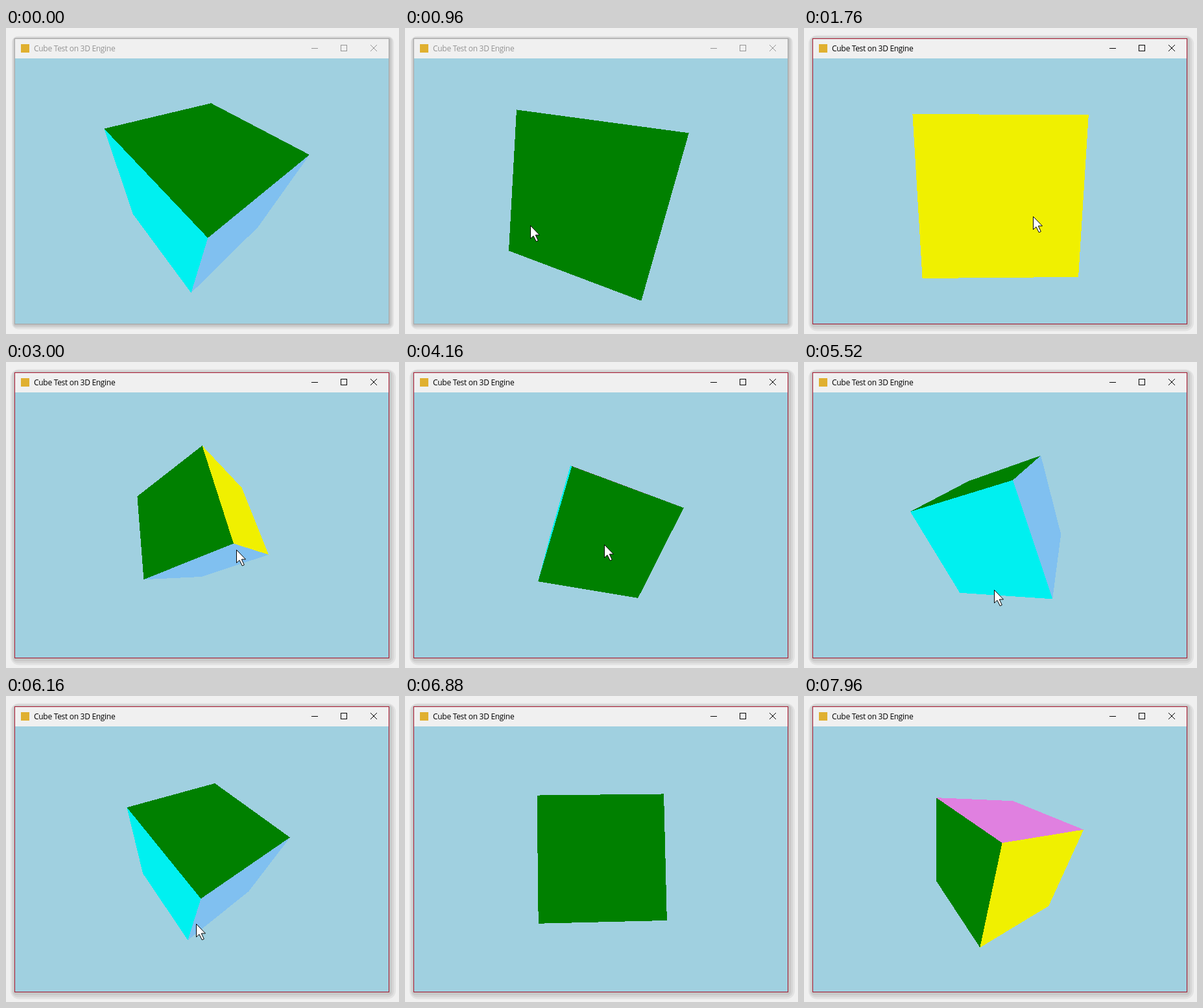
An HTML page that plays this animation: 606 px wide and 473 px high, repeating every 8000 ms.

```html
<!DOCTYPE html>
<html lang="en">
<head>
<meta charset="utf-8">
<title>Cube Test</title>
<style>
  html, body { margin: 0; width: 100%; height: 100%; overflow: hidden; background: #f0f0f0; }
  svg { display: block; width: 606px; height: 473px; }
  text { font: 12px "Open Sans", "Noto Sans", sans-serif; letter-spacing: -.3px; }
</style>
</head>
<body>
<svg viewBox="0 0 606 473">
  <g id="shadow"></g>
  <rect id="frame" x="13.5" y="16.5" width="577" height="441" fill="#f0f0f0"/>
  <rect x="14" y="47" width="576" height="410" fill="#a0d0e0"/>
  <rect x="23" y="25" width="13" height="13" fill="#e0b030"/>
  <text id="title" x="43" y="36">Cube Test on 3D Engine</text>
  <g id="buttons" fill="none">
    <path d="M471 31.5H481M516.5 26.5H525.5V35.5H516.5Z" shape-rendering="crispEdges"/>
    <path d="M562 26L572 36M572 26L562 36"/>
  </g>
  <g id="cube" shape-rendering="crispEdges"></g>
  <path id="cursor" d="M.5 .5V20.5L5 16.4L9.3 25L12.3 23.6L8.3 15H14.5Z" fill="#fff" stroke="#000"/>
</svg>
<script>
const LOOP = 8000, STEP = 40, FOV = 256, CX = 302, CY = 252, ACTIVATE = 1200;

// [time, degrees]: the turning speed changes at each key
const ANGLE = [[0, -31], [840, 3], [1760, 83], [3000, 153], [4160, 196],
  [5520, 307], [6880, 359], [8000, 400]];

// [time, x, y]: the pointer is shown from the first key to the last
const POINTER = [[400, 591, 290], [800, 135, 310], [1400, 353, 291], [3000, 355, 290],
  [4160, 307, 282], [5520, 293, 352], [6680, 293, 352], [6760, 544, 369]];

// +x, -x, +y, -y, +z, -z
const COLORS = ['#f0f000', '#00f0f0', '#80c0f0', '#e080e0', '#8a2be2', '#008000'];

const $ = id => document.getElementById(id);
const show = (el, on) => { el.style.display = on ? '' : 'none'; };
const ramp = (t, from, to) => Math.min(1, Math.max(0, (t - from) / (to - from)));

function add(parent, tag, attrs) {
  const el = document.createElementNS('http://www.w3.org/2000/svg', tag);
  setAll(el, attrs);
  return parent.appendChild(el);
}

function setAll(el, attrs) {
  for (const name in attrs) el.setAttribute(name, attrs[name]);
}

function sample(keys, t) {
  const next = keys.findIndex(k => k[0] >= t);
  const i = next < 0 ? keys.length - 1 : Math.max(1, next);
  const [t0, ...a] = keys[i - 1], [t1, ...b] = keys[i];
  const f = ramp(t, t0, t1);
  return a.map((v, n) => v + (b[n] - v) * f);
}

// the same angle about x, then y, then z
function rotate([x, y, z], s, c) {
  [y, z] = [y * c - z * s, y * s + z * c];
  [x, z] = [x * c + z * s, z * c - x * s];
  return [x * c - y * s, x * s + y * c, z];
}

const faces = COLORS.map((fill, i) => {
  const axis = i >> 1, side = i % 2 ? -1 : 1;
  const place = (u, v) => {
    const p = [];
    p[axis] = side;
    p[(axis + 1) % 3] = u;
    p[(axis + 2) % 3] = v;
    return p;
  };
  return {
    el: add($('cube'), 'polygon', { fill }),
    normal: place(0, 0),
    corners: [place(-1, -1), place(1, -1), place(1, 1), place(-1, 1)]
  };
});

const shadow = [0, 1, 2, 3].map(i => {
  const g = 226 - 13 * i;
  return add($('shadow'), 'rect', { fill: `rgb(${g},${g},${g})` });
});

function drawCube(t) {
  const angle = sample(ANGLE, t)[0] * Math.PI / 180;
  const s = Math.sin(angle), c = Math.cos(angle);
  const dist = 3 + ramp(t, 2520, 2720) - 0.4 * ramp(t, 4080, 4240);
  const project = p => {
    const [x, y, z] = rotate(p, s, c), k = FOV / (dist + z);
    return `${(CX + x * k).toFixed(2)},${(CY + y * k).toFixed(2)}`;
  };
  for (const { el, normal, corners } of faces) {
    show(el, 1 + dist * rotate(normal, s, c)[2] < 0);
    el.setAttribute('points', corners.map(project).join(' '));
  }
}

function drawWindow(t) {
  const active = t >= ACTIVATE, ink = active ? '#000' : '#949494';
  const spread = active ? 6 : 4;
  shadow.forEach((el, i) => {
    const d = spread * (1 - i / 3);
    setAll(el, { x: 13 - d, y: 16 - d * 0.8, width: 579 + d * 2.5, height: 443 + d * 2.4, rx: 1 + d * 2 });
  });
  $('frame').setAttribute('stroke', active ? '#a81830' : '#a8a8a8');
  $('title').setAttribute('fill', ink);
  $('buttons').setAttribute('stroke', ink);
}

function drawCursor(t) {
  const [x, y] = sample(POINTER, t).map(Math.round);
  show($('cursor'), t >= POINTER[0][0] && t <= POINTER[POINTER.length - 1][0]);
  $('cursor').setAttribute('transform', `translate(${x} ${y})`);
}

function render(ms) {
  const t = Math.floor((ms % LOOP) / STEP) * STEP;
  drawWindow(t);
  drawCube(t);
  drawCursor(t);
}

const start = performance.now();
function tick() {
  render(performance.now() - start);
  requestAnimationFrame(tick);
}
tick();
</script>
</body>
</html>
```
